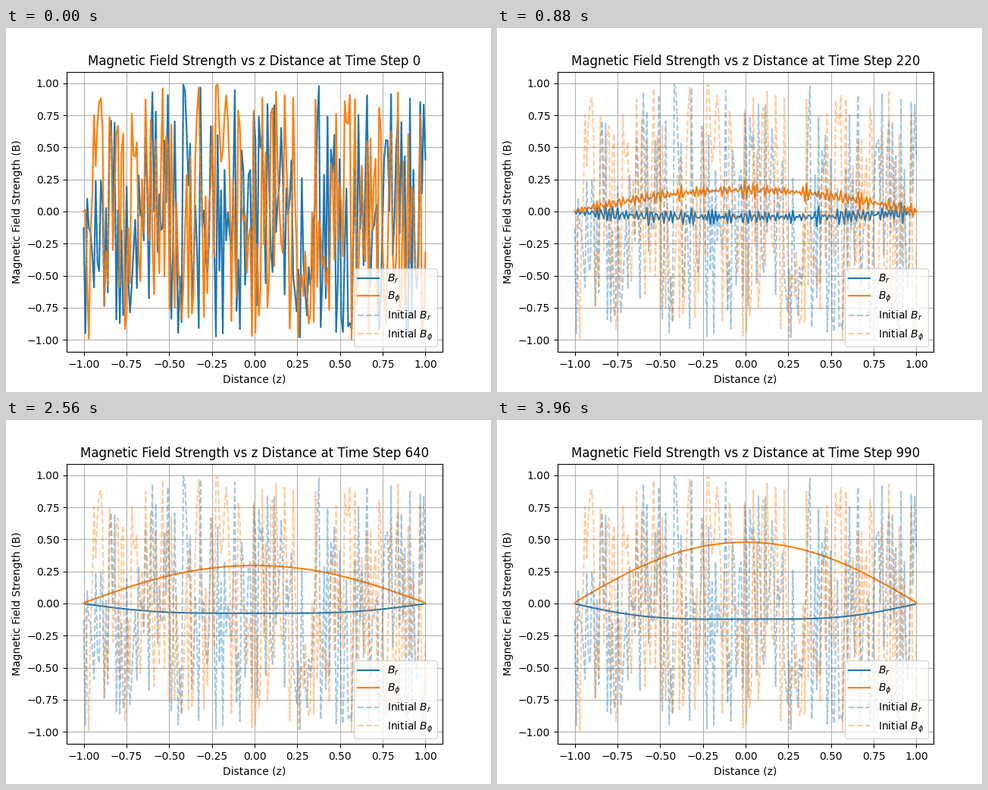
These frames come from a looping animation (640 px wide and 480 px high, 4 s). A matplotlib script:

```python
import numpy as np
import matplotlib.pyplot as plt
from matplotlib.animation import FuncAnimation

POINTS = 200
FRAMES = 100
STRIDE = 10          # time steps per drawn frame
DT = 0.01
ETA = 1.0            # diffusion
ALPHA = 0.99         # strength of the alpha effect
SHEAR = -8.92        # differential rotation

z = np.linspace(-1, 1, POINTS)
dz = z[1] - z[0]
alpha = ALPHA * np.sin(np.pi * z)


def diffusion_matrices():
    """Crank-Nicolson matrices: implicit inverse and explicit side."""
    r = ETA * DT / dz**2
    lap = (np.diag(np.full(POINTS, -2.0))
           + np.diag(np.ones(POINTS - 1), 1)
           + np.diag(np.ones(POINTS - 1), -1))
    eye = np.eye(POINTS)
    return np.linalg.inv(eye - r / 2 * lap), eye + r / 2 * lap


def simulate(br, bphi):
    implicit, explicit = diffusion_matrices()
    history = []
    for step in range(FRAMES * STRIDE):
        if step % STRIDE == 0:
            history.append((br, bphi))
        src_r = alpha * np.gradient(bphi, dz)
        src_phi = SHEAR * br
        br = implicit @ (explicit @ br + DT * src_r)
        bphi = implicit @ (explicit @ bphi + DT * src_phi)
        for field in (br, bphi):
            field[0] = field[-1] = 0
    return history


np.random.seed(2)
br0 = np.random.uniform(-1, 1, POINTS)
bphi0 = np.random.uniform(-1, 1, POINTS)
history = simulate(br0, bphi0)

fig, ax = plt.subplots(figsize=(6.4, 4.8), dpi=100)
line_r, = ax.plot(z, br0, color="tab:blue", label=r"$B_r$")
line_phi, = ax.plot(z, bphi0, color="tab:orange", label=r"$B_\phi$")
ax.plot(z, br0, "--", color="tab:blue", alpha=0.4, label=r"Initial $B_r$")
ax.plot(z, bphi0, "--", color="tab:orange", alpha=0.4, label=r"Initial $B_\phi$")
ax.set_xlabel("Distance (z)")
ax.set_ylabel("Magnetic Field Strength (B)")
title = ax.set_title("")
ax.grid(True)
ax.legend(loc="lower right")


def update(i):
    br, bphi = history[i]
    line_r.set_ydata(br)
    line_phi.set_ydata(bphi)
    title.set_text("Magnetic Field Strength vs z Distance "
                   f"at Time Step {i * STRIDE}")
    return line_r, line_phi, title


anim = FuncAnimation(fig, update, frames=FRAMES, interval=40,
                     repeat=True, repeat_delay=0, blit=False)
plt.show()
```
